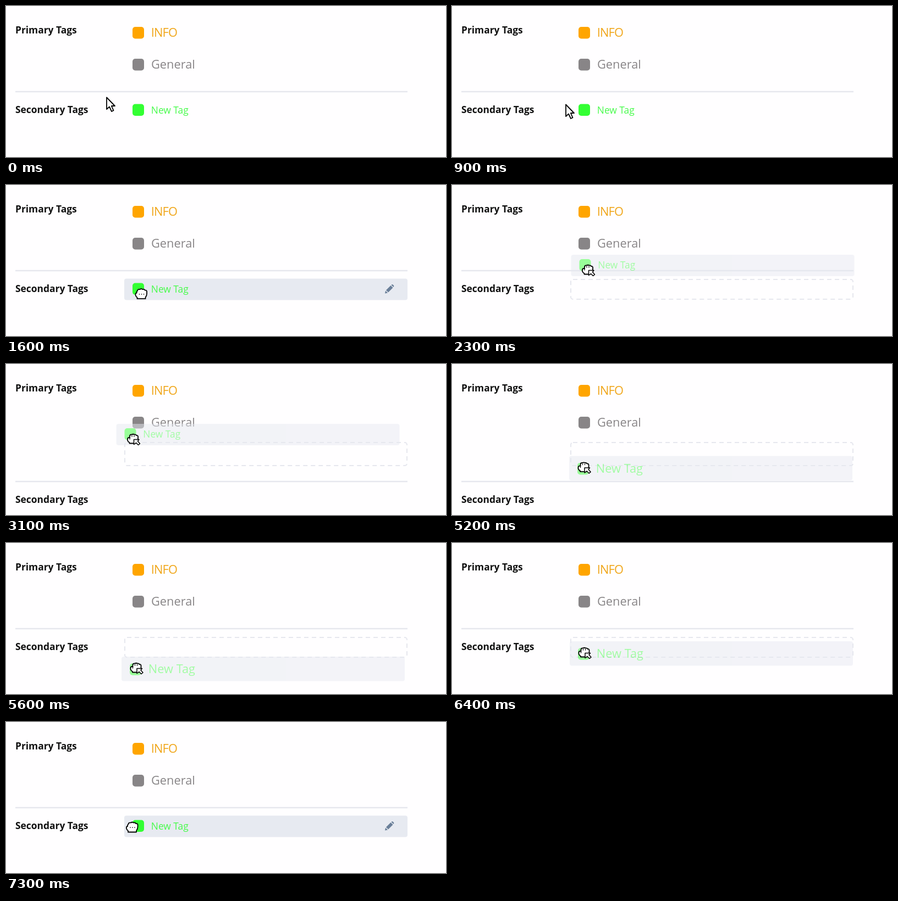
An HTML page that plays this animation: 800x275 px, repeating every 7.4 s.

```html
<!DOCTYPE html>
<html lang="en">
<head>
<meta charset="utf-8">
<title>Tag sorting</title>
<style>
  html, body { margin: 0; width: 100%; height: 100%; overflow: hidden; background: #fffeff; }
  svg { display: block; width: 100%; height: 100%; }
  text { font-family: "Open Sans", sans-serif; font-size: 21.8px; }
  .label { font-size: 17.4px; font-weight: 700; fill: #111; }
  .caps { letter-spacing: -.8px; }
  .cursor { fill: #fff; stroke: #000; stroke-width: 1.8; stroke-linejoin: round; stroke-linecap: round; }
</style>
</head>
<body>
<svg viewBox="0 0 800 275">
  <text class="label" x="17" y="49.5">Primary Tags</text>
  <g fill="#ffa500">
    <rect x="230" y="38" width="21" height="21.5" rx="5"/>
    <text class="caps" x="263.7" y="55.5" fill="#f0a61a">INFO</text>
  </g>
  <g fill="#888587">
    <rect x="230" y="96" width="21" height="21.5" rx="5"/>
    <text x="264" y="113.5">General</text>
  </g>

  <g id="secondary">
    <path d="M17 156H730" stroke="#e6e7ee" stroke-width="2.5"/>
    <text class="label" x="17" y="194.7">Secondary Tags</text>
  </g>

  <rect id="slot" x="216" width="513" rx="4" fill="none" stroke="#e6e7ee" stroke-width="2" stroke-dasharray="8 6"/>

  <g id="tag">
    <rect id="bar" width="515" rx="4" fill="#e7eaf1"/>
    <rect id="swatch" x="15" width="21" height="21.5" rx="5" fill="#33ff33"/>
    <text id="name" x="48.8" fill="#48fb4c">New Tag</text>
    <g id="pencil" fill="#6a7f99">
      <path d="M-8 8L-7 3L-3 7ZM-6 2L2.5 -6.5L6.5 -2.5L-2 6ZM3.5 -7.5L4.5 -8.3Q5.5 -8.8 6.5 -8L8 -6.5Q8.8 -5.5 8 -4.5L7.5 -3.5Z"/>
    </g>
  </g>

  <g id="pointer" class="cursor">
    <path id="arrow" d="M0 .5V22L5 17.5L9 26L12.5 24.3L8.8 16H15Z"/>
    <g id="hand">
      <path d="M-8 -1Q-10 -1 -10 1V3Q-9 6 -7 7V9.5H8V7Q10.5 4 10.5 0V-4Q10 -6.5 7 -6Q6 -8.5 3 -7.5Q0 -9.5 -2 -7.5Q-6 -8.5 -6.5 -5Q-8 -4.5 -8 -1Z"/>
      <path d="M-3 1V1.3M1 1V1.3M5 1V1.3" stroke-width="1.6"/>
    </g>
    <g id="fist">
      <path d="M-8 -2Q-10.5 -2 -10.5 1V3Q-9.5 6 -7 7V8.5H4V7Q8.5 4 8.5 0V-4Q8 -6.5 5.5 -6Q4.5 -8 2 -7.5Q-.5 -9 -2.5 -7.5Q-6 -8 -6.5 -5V-2Z"/>
      <path d="M-6.5 -2V1M-2.5 -5.5V-4M1.5 -5.5V-4" fill="none" stroke-width="1.3"/>
      <path d="M1 1.5H10.5L8 4.5L12 9L9 11.5L5 7.5L1 10.5Z" stroke-width="1.5"/>
    </g>
  </g>
</svg>
<script>
const LOOP = 7400, STEP = 100;
const $ = id => document.getElementById(id);

// time, x, y of the pointer's hot spot
const path = [
  [0, 183, 166], [500, 192, 169], [900, 207, 179], [1300, 243, 196], [1700, 246, 198],
  [2300, 247.5, 154], [3100, 231.5, 136], [3300, 232, 134], [3700, 239, 155],
  [4400, 238, 158], [4900, 242, 162], [5600, 237, 227], [5900, 239, 238],
  [6400, 241, 199], [6600, 242, 196], [7200, 239, 191], [7300, 229, 191]
];

const hoverStart = 1100;
const drags = [
  { from: 1700, to: 3700, dx: 31, dy: 27, large: false },
  { from: 4900, to: 6600, dx: 27, dy: 20, large: true }
];
const promoted = { from: 2600, to: 5300 };

const within = (t, span) => t >= span.from && t < span.to;
const show = (id, on) => $(id).style.display = on ? "" : "none";
const move = (id, x, y) => $(id).setAttribute("transform", `translate(${x} ${y})`);

function pointerAt(t) {
  const i = path.findIndex(key => key[0] > t);
  if (i < 0) return path[path.length - 1].slice(1);
  const [t0, x0, y0] = path[i - 1], [t1, x1, y1] = path[i];
  const p = (t - t0) / (t1 - t0), e = p * p * (3 - 2 * p);
  return [x0 + (x1 - x0) * e, y0 + (y1 - y0) * e];
}

function sizeTag(large) {
  const height = large ? 44.5 : 39;
  $("bar").setAttribute("height", height);
  $("swatch").setAttribute("y", large ? 12.3 : 8);
  $("name").setAttribute("y", large ? 30 : 25.3);
  $("name").style.fontSize = large ? "21.8px" : "17.4px";
  move("pencil", 482, height / 2 - 0.5);
}

function draw(t) {
  const [x, y] = pointerAt(t);
  const drag = drags.find(d => within(t, d));
  const primary = within(t, promoted);
  const hover = t >= hoverStart && !drag;
  const home = primary ? 141.5 : 170.5;

  move("secondary", 0, primary ? 58 : 0);
  sizeTag(drag ? drag.large : primary);
  move("tag", drag ? x - drag.dx : 215, drag ? y - drag.dy : home);
  $("tag").setAttribute("opacity", drag ? 0.5 : 1);
  show("bar", drag || hover);
  show("pencil", hover);

  show("slot", drag);
  $("slot").setAttribute("y", home + 1.5);
  $("slot").setAttribute("height", primary ? 42 : 36);

  move("pointer", x, y);
  show("arrow", t < hoverStart);
  show("hand", hover);
  show("fist", drag);
}

const start = performance.now();
function tick() {
  const t = (performance.now() - start) % LOOP;
  draw(Math.floor(t / STEP) * STEP);
  requestAnimationFrame(tick);
}
tick();
</script>
</body>
</html>
```
